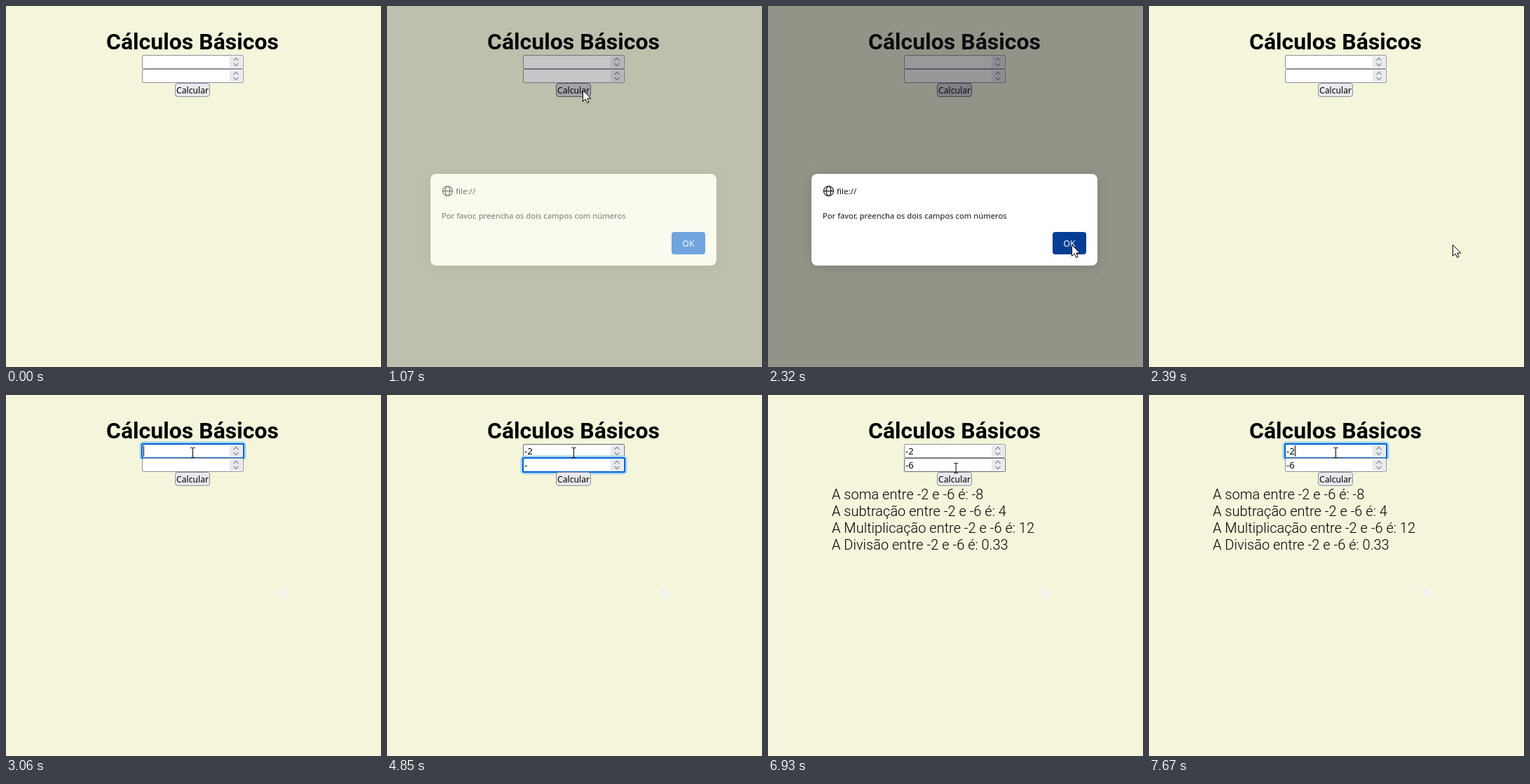
Animation of 535 by 516 pixels, one loop 8000 ms. Source, as an HTML page:

```html
<!DOCTYPE html>
<html lang="pt">
<head>
<meta charset="utf-8">
<title>Cálculos Básicos</title>
<style>
html, body { margin: 0; width: 100%; height: 100%; overflow: hidden; background: #f5f5dc; }
svg { display: block; width: 535px; height: 516px; }
text { white-space: pre; }
.title { font: 700 32px Roboto, sans-serif; }
.result { font: 300 20px Roboto, sans-serif; }
.ui { font: 12.2px "Noto Sans", sans-serif; }
.value { font-size: 13.2px; }
.dialog { font: 11.25px "Noto Sans", sans-serif; fill: #15141a; }
.line { fill: none; stroke: #15141a; stroke-width: 1.2; }
</style>
</head>
<body>
<svg viewBox="0 0 535 516">
  <rect width="535" height="516" fill="#f5f5dc"/>
  <text class="title" x="266" y="62" text-anchor="middle">Cálculos Básicos</text>
  <g id="fields"></g>
  <rect id="button" x="241.5" y="110.5" width="49" height="19" rx="3.5"/>
  <text class="ui" x="266" y="125" text-anchor="middle">Calcular</text>
  <g id="results"></g>
  <path id="trace" fill="#f0f0f2" transform="translate(391.5 272.5)"/>
  <g id="modal">
    <rect width="535" height="516" fill="#1c1b22" opacity=".45"/>
    <rect x="62" y="240" width="408" height="131" rx="8" fill="#fff" style="filter:drop-shadow(0 2px 7px #3a394433)"/>
    <g class="line">
      <circle cx="86.5" cy="264.5" r="7"/>
      <ellipse cx="86.5" cy="264.5" rx="3.3" ry="7"/>
      <path d="M79.5 264.5h14"/>
    </g>
    <text class="dialog" x="98" y="269" style="font-size:11.6px;font-weight:500">file://</text>
    <text class="dialog" x="78" y="304">Por favor, preencha os dois campos com números</text>
    <rect id="ok" x="406" y="323" width="48" height="32" rx="4"/>
    <text class="dialog" x="430" y="344" text-anchor="middle" style="fill:#fbfbfe;font-size:12px">OK</text>
  </g>
  <circle id="halo" r="12" fill="#ffee00" opacity=".5"/>
  <path id="arrow" fill="#fff" stroke="#000"/>
  <path id="beam" fill="none" stroke="#000" d="M-3 -6.5h2.5l.5 .5l.5 -.5h2.5M0 -6v13M-3 7.5h2.5l.5 -.5l.5 .5h2.5"/>
</svg>
<script>
const LOOP = 8000;
const $ = id => document.getElementById(id);
const within = (t, ...spans) => spans.some(([a, b]) => t >= a && t < b);
const set = (el, attrs) => { for (const k in attrs) el.setAttribute(k, attrs[k]); };
const show = (el, on) => set(el, { visibility: on ? 'visible' : 'hidden' });
const inside = (p, x, y, w, h) => p.x >= x && p.x < x + w && p.y >= y && p.y < y + h;

const ARROW = 'M0 0V16L3.7 12.6L6.1 18L8.6 17L6.3 11.6H11.4Z';
set($('arrow'), { d: ARROW });
set($('trace'), { d: ARROW });

// Pointer moves: start time, end time, destination
const START = { x: 508, y: 500 };
const MOVES = [
  [70, 690, 279.5, 120.5],
  [1380, 1880, 424, 364],
  [1880, 2120, 433.5, 341.5],
  [2390, 2990, 266, 82],
  [5580, 5710, 337, 134],
  [5850, 6110, 262, 111],
  [6510, 6710, 268.5, 115],
  [6800, 7140, 266, 82]
];
const CLICKS = [[1000, 1070], [2250, 2320], [6110, 6370], [7400, 7600]];
const CARETS = [[3060, 3520], [3930, 4850], [5180, 5380], [7400, LOOP]];

function pointerAt(t) {
  const p = { ...START };
  for (const [from, to, x, y] of MOVES) {
    if (t < from) break;
    const u = Math.min(1, (t - from) / (to - from));
    const e = u * u * (3 - 2 * u);
    p.x += (x - p.x) * e;
    p.y += (y - p.y) * e;
  }
  return p;
}

function typed(t, dashAt, digitAt, digit) {
  return t < dashAt ? '' : t < digitAt ? '-' : '-' + digit;
}

$('fields').innerHTML = [70, 90].map(y => `<g>
  <rect x="190.5" y="${y - 3.5}" width="152" height="27" rx="5" fill="#a3d3e8"/>
  <rect x="194.5" y="${y + .5}" width="144" height="19" rx="1.5" fill="#fff"/>
  <rect x="194" y="${y}" width="145" height="20" rx="1" fill="none" stroke="#0060df" stroke-width="2"/>
  <rect x="319" y="${y + 2}" width="18" height="16" fill="#e9e9ed"/>
  <path d="M324.5 ${y + 8}l3.5 -3.5l3.5 3.5m0 4l-3.5 3.5l-3.5 -3.5" fill="none" stroke="#8795a1" stroke-width="1.3"/>
  <text class="ui value" x="196" y="${y + 15}"></text>
  <rect y="${y + 2}" width="1" height="16"/>
</g>`).join('');

const fields = [...$('fields').children].map((g, i) => {
  const [glow, box, ring, , , label, caret] = g.children;
  return { y: 70 + 20 * i, glow, box, ring, label, caret };
});

$('results').innerHTML = ['soma', 'subtração', 'Multiplicação', 'Divisão'].map((name, i) =>
  `<text class="result" x="91" y="${149 + 24 * i}">A ${name} entre -2 e -6 é: ${['-8', '4', '12', '0.33'][i]}</text>`
).join('');

function drawField(f, value, focused, caretOn, hovered) {
  show(f.glow, focused);
  show(f.ring, focused);
  set(f.box, { stroke: hovered ? '#676774' : '#8f8f9d' });
  f.label.textContent = value;
  set(f.caret, { x: [196, 201, 208][value.length] });
  show(f.caret, focused && caretOn);
}

function draw(t) {
  const p = pointerAt(t);
  const modal = within(t, [1040, 2390]);
  const pressed = within(t, ...CLICKS);

  const focus = within(t, [3060, 4320], [7400, LOOP]) ? 0 : within(t, [4320, 6110]) ? 1 : -1;
  const values = [typed(t, 3930, 4060, 2), typed(t, 4650, 5180, 6)];
  const caretOn = within(t, ...CARETS);
  fields.forEach((f, i) =>
    drawField(f, values[i], focus === i, caretOn, !modal && inside(p, 194, f.y, 145, 20)));

  const overButton = modal || inside(p, 241, 110, 50, 20);
  const down = overButton && !modal && pressed;
  set($('button'), {
    fill: down ? '#b1b1b9' : overButton ? '#d0d0d7' : '#e9e9ed',
    stroke: down ? '#484851' : overButton ? '#676774' : '#8f8f9d'
  });
  show($('results'), t >= 6370);
  show($('trace'), t >= 2520);

  show($('modal'), modal);
  set($('modal'), { opacity: Math.min(1, Math.max(0, (t - 1000) / 130)) });
  const overOk = inside(p, 406, 323, 48, 32);
  set($('ok'), { fill: t >= 2250 ? '#053e94' : overOk ? '#0250bb' : '#0061e0' });

  const beam = !modal && inside(p, 194, 70, 125, 40);
  const place = { transform: `translate(${p.x} ${p.y})` };
  set($('halo'), place);
  set($('arrow'), place);
  set($('beam'), { transform: `translate(${p.x + .5} ${p.y})` });
  show($('halo'), pressed);
  show($('arrow'), t >= 70 && !beam);
  show($('beam'), beam);
}

const began = performance.now();
function tick() {
  draw((performance.now() - began) % LOOP);
  requestAnimationFrame(tick);
}
tick();
</script>
</body>
</html>
```
